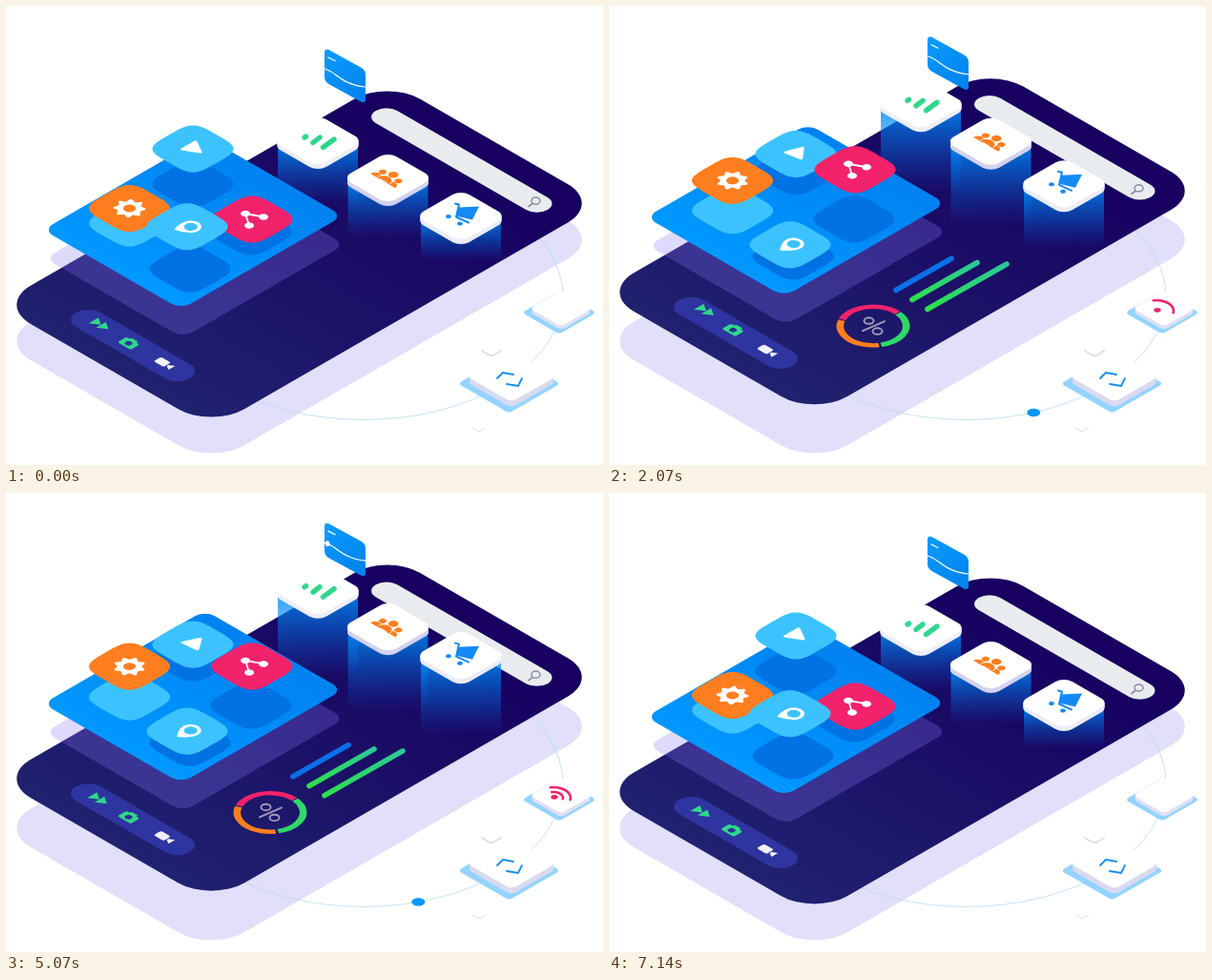
Write an HTML page with a canvas that moves like this. It is 626 by 482 pixels and loops after 7.21 s.

```html
<!DOCTYPE html>
<html>
<head>
<meta charset="utf-8">
<style>
html, body { margin: 0; width: 100%; height: 100%; overflow: hidden; background: #fff; }
canvas { display: block; }
</style>
</head>
<body>
<canvas id="stage" width="626" height="482"></canvas>
<script>
const ctx = document.getElementById('stage').getContext('2d');
const LOOP = 7210, TAU = Math.PI * 2;
const NAVY = ['#170060', '#20226f'], SKY = '#3cc3ff', SLOT = '#0072e4';
const PINK = '#f2226b', GREEN = '#2fd78c', ORANGE = '#ff7e1f', BLUE = '#0a8ff5';

const smooth = x => { x = Math.min(1, Math.max(0, x)); return x * x * (3 - 2 * x); };
// Rises from 0 to 1 at a, falls back at b, each over w.
const pulse = (p, a, b, w) => smooth((p - a) / w) - smooth((p - b) / w);
const mix = (a, b, k) => a + (b - a) * k;

function at(x, y, draw) {
  ctx.save();
  ctx.translate(x, y);
  draw();
  ctx.restore();
}
// Local x runs down-right, local y down-left.
function iso(x, y, draw) {
  at(x, y, () => { ctx.transform(.866, .5, -.866, .5, 0, 0); draw(); });
}
function fill(color) { ctx.fillStyle = color; ctx.fill(); }
function stroke(color, width) { ctx.strokeStyle = color; ctx.lineWidth = width; ctx.stroke(); }
function ramp(x0, y0, x1, y1, from, to) {
  const g = ctx.createLinearGradient(x0, y0, x1, y1);
  g.addColorStop(0, from);
  g.addColorStop(1, to);
  return g;
}
function path(points, close) {
  ctx.beginPath();
  points.forEach(([x, y]) => ctx.lineTo(x, y));
  if (close) ctx.closePath();
}
function poly(points, color) { path(points, true); fill(color); }
function line(points, color, width) { path(points); stroke(color, width); }
function disc(x, y, rx, ry, color) {
  ctx.beginPath();
  ctx.ellipse(x, y, rx, ry, 0, 0, TAU);
  fill(color);
}
function plate(x, y, w, h, r, color) {
  iso(x, y, () => {
    ctx.beginPath();
    ctx.roundRect(-w / 2, -h / 2, w, h, r);
    fill(color);
  });
}
function slab(x, y, size, r, depth, side) {
  for (let d = depth; d > 0; d--) plate(x, y + d, size, size, r, side);
  plate(x, y, size, size, r, '#fff');
}
function squircle(x, y, color) {
  const root = v => Math.sign(v) * Math.sqrt(Math.abs(v)) * 29.2;
  iso(x, y, () => {
    const pts = [];
    for (let i = 0; i < 96; i++) {
      const a = i / 96 * TAU;
      pts.push([root(Math.cos(a)), root(Math.sin(a))]);
    }
    poly(pts, color);
  });
}

function orbit(t) {
  ctx.beginPath();
  ctx.ellipse(375, 304.5, 209, 130, 0, 0, TAU);
  stroke('#b4dcf0', .8);
  const half = 1 - Math.abs(1 - t / LOOP * 2);
  const a = mix(6, 125, smooth((half - .1) / .9)) * Math.PI / 180;
  disc(375 + 209 * Math.cos(a), 304.5 + 130 * Math.sin(a), 7, 4.2, '#0a98ff');
}

function wifi(p) {
  const within = (a, b) => p > a && p < b;
  const arc = (rx, ry) => {
    ctx.beginPath();
    ctx.ellipse(574, 320, rx, ry, 0, -1.75, .2);
    stroke(PINK, 2.6);
  };
  if (within(.3, .59)) disc(575, 319.3, 3.6, 2.4, PINK);
  if (within(.2, .55) || within(.59, .72)) arc(10, 6);
  if (within(.3, .7)) arc(18, 11);
}

function sideTiles(p) {
  plate(580, 322, 45, 45, 4, '#93d4ff');
  slab(582, 317.5, 38, 5, 4, '#dfe0f3');
  wifi(p);
  plate(527.5, 396.5, 62, 62, 4, '#93d4ff');
  slab(530, 389, 54, 6, 6, '#d9d9f0');
  line([[515, 391], [521, 385], [532, 387]], '#1490f2', 1.8);
  line([[525, 397], [537, 399], [541, 391]], '#1490f2', 1.8);
  slab(509, 360, 14, 3, 2, '#dcdcec');
  slab(496, 442, 9, 2, 1, '#dcdcec');
}

function dockIcons(p) {
  const q = p * 2 % 1;
  const hop = c => Math.max(0, Math.cos((q - c) / .24 * Math.PI / 2)) * (Math.abs(q - c) < .24);
  const icon = (x, y, c, draw) => iso(x + 4 * hop(c), y - 2 * hop(c), draw);
  icon(98, 335.5, .18, () => {
    for (const x of [-9, 0]) poly([[x, -6], [x + 9, 0], [x, 6]], GREEN);
  });
  icon(129, 354, .33, () => {
    ctx.beginPath();
    ctx.roundRect(-8, -5, 16, 11, 2);
    ctx.roundRect(-4, -7, 8, 4, 1);
    fill(GREEN);
    disc(0, .5, 3.2, 3.2, '#2b3097');
  });
  icon(166, 375.5, .46, () => {
    ctx.beginPath();
    ctx.roundRect(-9, -5, 12, 9, 2);
    fill('#f1f1fb');
    poly([[4, -1], [9, -4], [9, 4], [4, 1]], '#f1f1fb');
  });
}

function phone() {
  iso(307.5, 260.5, () => {
    ctx.beginPath();
    ctx.roundRect(-129.5, -236, 259, 472, 40);
    fill(ramp(0, -200, 0, 236, ...NAVY));
  });
  const capsule = (x, y, length, width, color) =>
    iso(x, y, () => line([[0, 0], [length, 0]], color, width));
  capsule(399, 116.5, 182, 26, '#e9ecef');
  capsule(86.4, 329.6, 107.6, 30, '#2e34a0');
  ctx.beginPath();
  ctx.ellipse(555.5, 204.5, 4.5, 3.6, 0, 0, TAU);
  stroke('#8d8c9e', 1.5);
  line([[552, 207.5], [548, 210.5]], '#8d8c9e', 1.8);
}

function chart(p) {
  const bars = [
    [301, 311.5, 58, .1, '#0a6fe8', '#0a6fe8'],
    [318, 321.5, 68, .155, '#2ee04a', '#2bc89a'],
    [334, 331.5, 83, .22, '#2ee04a', '#2bc89a']
  ];
  for (const [x, y, w, start, from, to] of bars) {
    const k = pulse(p, start, start + .54, .2);
    if (k <= 0) continue;
    const dx = w * k;
    line([[x, y], [x + dx, y - dx * .57]], ramp(x, y, x + w, y - w * .57, from, to), 5.6);
  }
  const sweep = 360 * pulse(p, .22, .72, .2);
  const parts = [[0, 117, '#2fd868'], [119, 236, PINK], [239, 356, ORANGE]];
  at(277, 349.3, () => {
    ctx.save();
    ctx.scale(1, .585);
    ctx.lineCap = 'butt';
    const rad = d => (76 - d) * Math.PI / 180;
    for (const [from, to, color] of parts) {
      if (sweep <= from) continue;
      ctx.beginPath();
      ctx.arc(0, 0, 34.7, rad(from), rad(Math.min(to, sweep)), true);
      stroke(color, 7.6);
    }
    ctx.restore();
    ctx.globalAlpha = pulse(p, .28, .72, .1);
    const gray = '#9d9bb8';
    line([[-11, 5], [12, -5]], gray, 2);
    for (const s of [-1, 1]) {
      ctx.beginPath();
      ctx.ellipse(4.5 * s, 5.5 * s, 5, 3.3, 0, 0, TAU);
      stroke(gray, 2);
    }
  });
}

function barsIcon() {
  line([[-14, -3.5], [-12.5, -4.5]], GREEN, 5.4);
  line([[-5, 2], [2, -3.5]], GREEN, 5.4);
  line([[5.5, 7], [17, -1.5]], GREEN, 5.4);
}
function peopleIcon() {
  iso(0, 0, () => {
    const person = (x, y, s) => {
      disc(x, y - 6 * s, 4 * s, 4 * s, ORANGE);
      ctx.beginPath();
      ctx.arc(x, y + 5 * s, 6.5 * s, Math.PI, 0);
      fill(ORANGE);
    };
    person(-9.5, 2, .85);
    person(9.5, 2, .85);
    ctx.beginPath();
    ctx.arc(0, 5, 8, Math.PI, 0);
    fill('#fff');
    person(0, 0, 1.1);
  });
}
function cartIcon() {
  const c = '#148af5';
  line([[-6, -13], [-2, -12], [-5, 1], [8, 7]], c, 2);
  poly([[-3, -9], [19, -10], [12, 4], [-5, 0]], c);
  disc(-13, .5, 2.8, 2, c);
  disc(-1, 8, 2.8, 2, c);
}

function pillars(p) {
  const list = [
    [327, 141.5, 25.5, .12, .62, .2, 208, '#eeeef9', barsIcon],
    [400.5, 180.5, 26, .055, .55, .21, 243, '#d3d3ee', peopleIcon],
    [477, 220.5, 36, 0, .47, .23, 268, '#ececf8', cartIcon]
  ];
  for (const [x, low, rise, a, b, w, base, side, icon] of list) {
    const y = low - rise * pulse(p, a, b, w);
    ctx.fillStyle = ramp(0, y, 0, base, 'rgba(0,146,255,.88)', 'rgba(0,100,220,0)');
    ctx.fillRect(x - 42, y, 84, base - y);
    slab(x, y, 55, 10, 5, side);
    at(x, y, icon);
  }
}

function playIcon(k) {
  iso(0, 0, () => {
    ctx.rotate(.42 * k);
    path([[-6, -9], [8, -1], [-6, 7]], true);
    fill('#fff');
    stroke('#fff', 3);
  });
}
function gearIcon(k) {
  iso(0, 0, () => {
    ctx.rotate(.3 * k);
    ctx.beginPath();
    for (let i = 0; i < 32; i++) {
      const r = i % 4 < 2 ? 13.8 : 10.6, a = (i + (i % 2 ? -.15 : .15)) / 32 * TAU;
      ctx.lineTo(r * Math.cos(a), r * Math.sin(a));
    }
    ctx.closePath();
    ctx.arc(0, 0, 5.4, 0, TAU, true);
    ctx.fill('evenodd');
  });
}
function pinIcon(k) {
  iso(0, 0, () => {
    ctx.rotate(.5 - .4 * k);
    ctx.beginPath();
    ctx.arc(1, -3, 9, Math.PI * .88, Math.PI * .12);
    ctx.quadraticCurveTo(7, 7, 1, 12);
    ctx.quadraticCurveTo(-5, 7, -7.4, .3);
    fill('#fff');
    disc(1, -3, 5.8, 5.8, SKY);
  });
}
function shareIcon() {
  line([[12, -2.5], [-7, -6], [-3, 6.5]], '#fff', 1.8);
  for (const [x, y] of [[12, -2.5], [-7, -6], [-3, 6.5]]) disc(x, y, 5, 3.3, '#fff');
}

function board(p) {
  plate(198, 257.8, 167, 196, 12, 'rgba(135,120,247,.275)');
  iso(196, 227.8, () => {
    ctx.beginPath();
    ctx.roundRect(-83.5, -98, 167, 196, 12);
    fill(ramp(0, -98, 0, 98, '#0082f0', '#0098ff'));
  });
  squircle(196, 187, SLOT);
  squircle(257, 237, SLOT);
  squircle(193, 276, SLOT);
  squircle(129.5, 228, SKY);
  const tiles = [
    [196, 150, 173, .015, .508, .24, SKY, playIcon],
    [258, 224, 185, .25, .64, .24, PINK, shareIcon],
    [129.5, 212.5, 196, .07, .55, .22, ORANGE, gearIcon],
    [190, 231.7, 264, .18, .64, .21, SKY, pinIcon]
  ];
  for (const [x, from, to, a, b, w, color, icon] of tiles) {
    const k = pulse(p, a, b, w);
    squircle(x, mix(from, to, k), color);
    ctx.fillStyle = '#fff';
    at(x, mix(from, to, k), () => icon(k));
  }
}

function wallet(t) {
  ctx.save();
  ctx.save();
  ctx.transform(1, .55, 0, 1, 334, 43.5);
  ctx.beginPath();
  ctx.roundRect(0, 0, 43, 36, 5);
  ctx.restore();
  fill(ramp(334, 45, 377, 103, '#0a9cff', '#0080ea'));
  ctx.clip();
  const knots = [[334, 66], [345, 68], [352, 83], [377, 85]];
  ctx.beginPath();
  ctx.moveTo(...knots[0]);
  ctx.bezierCurveTo(...knots[1], ...knots[2], ...knots[3]);
  stroke('#fff', 1.2);
  line([[338, 54], [345, 57.5]], '#fff', 1.3);
  ctx.restore();
  const x = 334 + (t % (LOOP / 3) - 175) * .0344;
  if (x < 334 || x > 377) return;
  // Solve the curve for x by bisection.
  const curve = (s, i) => {
    const r = 1 - s;
    return r * r * r * knots[0][i] + 3 * r * r * s * knots[1][i] +
      3 * r * s * s * knots[2][i] + s * s * s * knots[3][i];
  };
  let lo = 0, hi = 1;
  for (let i = 0; i < 20; i++) {
    const mid = (lo + hi) / 2;
    if (curve(mid, 0) < x) lo = mid; else hi = mid;
  }
  disc(x, curve(lo, 1), 2.4, 2.9, '#fff');
}

function render(t) {
  const p = t / LOOP * 2 % 1;
  ctx.fillStyle = '#fff';
  ctx.fillRect(0, 0, 626, 482);
  ctx.lineCap = ctx.lineJoin = 'round';
  plate(307.5, 298.5, 259, 472, 40, '#e1dff9');
  orbit(t);
  sideTiles(p);
  at(0, -10.75 * (1 - Math.cos(t / LOOP * TAU)), () => {
    phone();
    dockIcons(p);
    chart(p);
    pillars(p);
    board(p);
    wallet(t);
  });
}

const begin = performance.now();
function tick() {
  render((performance.now() - begin) % LOOP);
  requestAnimationFrame(tick);
}
tick();
</script>
</body>
</html>
```
